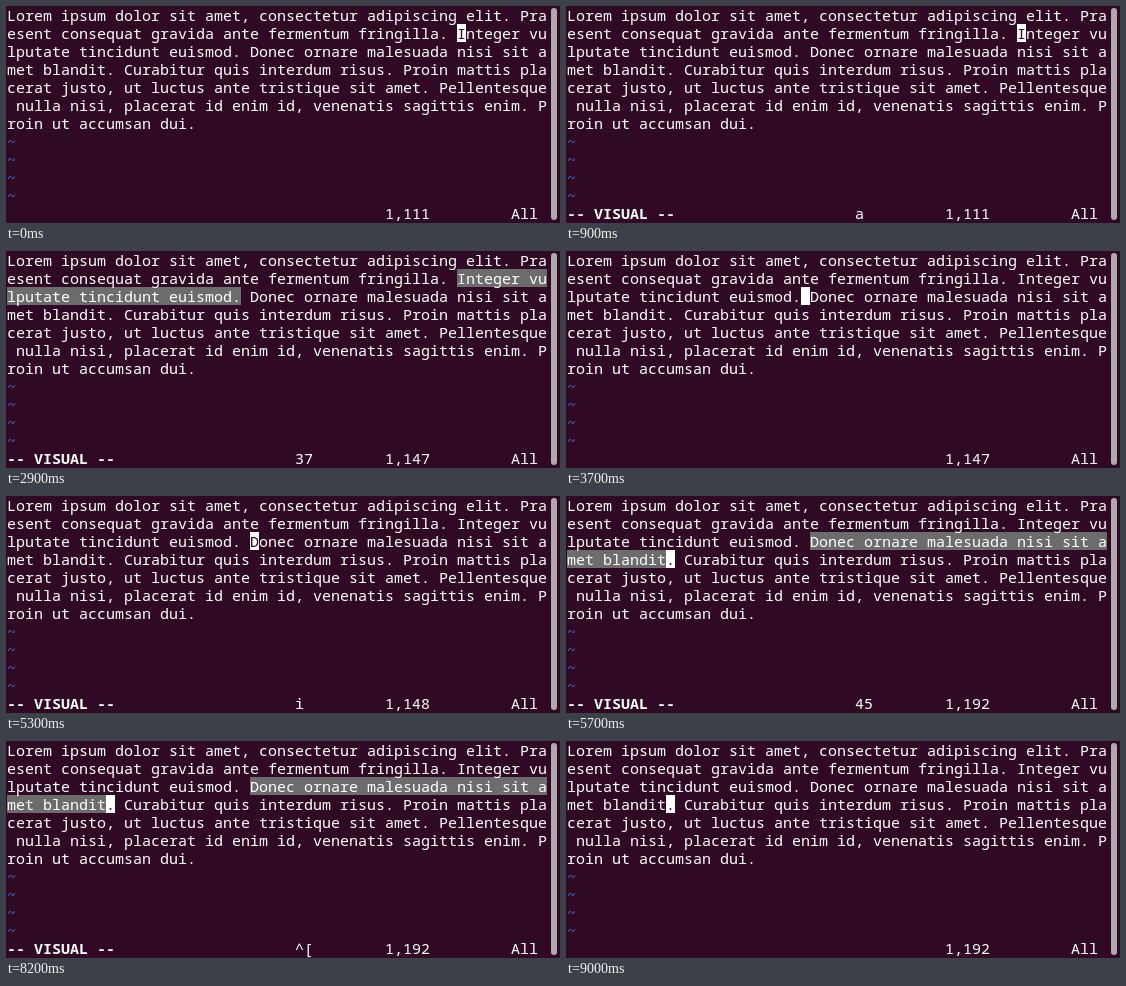
Write an HTML page that moves like this. It is 554 px wide and 217 px high and loops after 9200 ms.

```html
<!DOCTYPE html>
<html lang="la">
<head>
<meta charset="utf-8">
<title>Text object selection</title>
<style>
  html, body { margin: 0; width: 100%; height: 100%; overflow: hidden; background: #300a24; }
  #term { position: absolute; left: 1px; top: 0; color: #fff; font: 15px/18px "Noto Sans Mono", "DejaVu Sans Mono", monospace; font-variant-ligatures: none; }
  #term div { position: absolute; height: 18px; white-space: pre; }
  #term .sel { background: #6c6c6c; }
  #term .tilde { color: #3a68c8; }
  #term #mode { font-weight: bold; }
  #term #cursor { width: 9px; overflow: hidden; background: #fff; color: #300a24; }
  #bar { position: absolute; left: 545px; top: 2px; width: 6px; height: 212px; border-radius: 3px; background: #b0a8ad; }
</style>
</head>
<body>
<div id="term"></div>
<div id="bar"></div>
<script>
const COLS = 60, CELL = 9, ROW = 18, LOOP = 9200;
const text = "Lorem ipsum dolor sit amet, consectetur adipiscing elit. Praesent consequat gravida ante fermentum fringilla. Integer vulputate tincidunt euismod. Donec ornare malesuada nisi sit amet blandit. Curabitur quis interdum risus. Proin mattis placerat justo, ut luctus ante tristique sit amet. Pellentesque nulla nisi, placerat id enim id, venenatis sagittis enim. Proin ut accumsan dui.";
const term = document.getElementById("term");

function place(el, col, row) {
  el.style.left = col * CELL + "px";
  el.style.top = row * ROW + "px";
}

function add(col, row, content = "", name = "") {
  const el = document.createElement("div");
  el.textContent = content;
  el.className = name;
  place(el, col, row);
  return term.appendChild(el);
}

const bands = [1, 2, 3].map(row => ({ row, el: add(0, row, "", "sel") }));
for (let row = 0; row * COLS < text.length; row++) add(0, row, text.substr(row * COLS, COLS));
for (let row = 7; row < 11; row++) add(0, row, "~", "tilde");
const mode = add(0, 11, "-- VISUAL --");
mode.id = "mode";
const command = add(32, 11);
const ruler = add(42, 11);
add(56, 11, "All");
const cursor = add(0, 0);
cursor.id = "cursor";

// Each event changes only the listed parts of the state.
const events = [
  [0, { pos: 110, on: true, visual: false, cmd: "", from: null }],
  [100, { on: false }],
  [600, { on: true }],
  [700, { visual: true, cmd: "1" }],
  [900, { cmd: "a" }],
  [1100, { pos: 146, from: 110, cmd: "37" }],
  [1700, { on: false }],
  [2300, { on: true }],
  [2900, { on: false }],
  [3500, { on: true }],
  [3600, { cmd: "^[" }],
  [3700, { visual: false, cmd: "", from: null }],
  [4200, { pos: 147 }],
  [4800, { on: false }],
  [5000, { on: true }],
  [5100, { visual: true, cmd: "1" }],
  [5300, { cmd: "i" }],
  [5700, { pos: 191, from: 147, cmd: "45" }],
  [6300, { on: false }],
  [6900, { on: true }],
  [7500, { on: false }],
  [8100, { on: true }],
  [8200, { cmd: "^[" }],
  [8300, { visual: false, cmd: "", from: null }],
  [8900, { on: false }],
  [9000, { on: true }]
];

function draw(time) {
  const s = Object.assign({}, ...events.filter(e => e[0] <= time).map(e => e[1]));
  mode.hidden = !s.visual;
  command.textContent = s.cmd;
  ruler.textContent = "1," + (s.pos + 1);
  cursor.hidden = !s.on;
  cursor.textContent = text[s.pos];
  place(cursor, s.pos % COLS, Math.floor(s.pos / COLS));
  // The selection stops before the cursor cell.
  for (const { row, el } of bands) {
    const start = Math.max(s.from, row * COLS);
    const end = Math.min(s.pos, (row + 1) * COLS);
    el.hidden = s.from === null || end <= start;
    place(el, start - row * COLS, row);
    el.style.width = Math.max(0, end - start) * CELL + "px";
  }
}

const begin = performance.now();
function tick() {
  draw((performance.now() - begin) % LOOP);
  requestAnimationFrame(tick);
}
tick();
</script>
</body>
</html>
```
